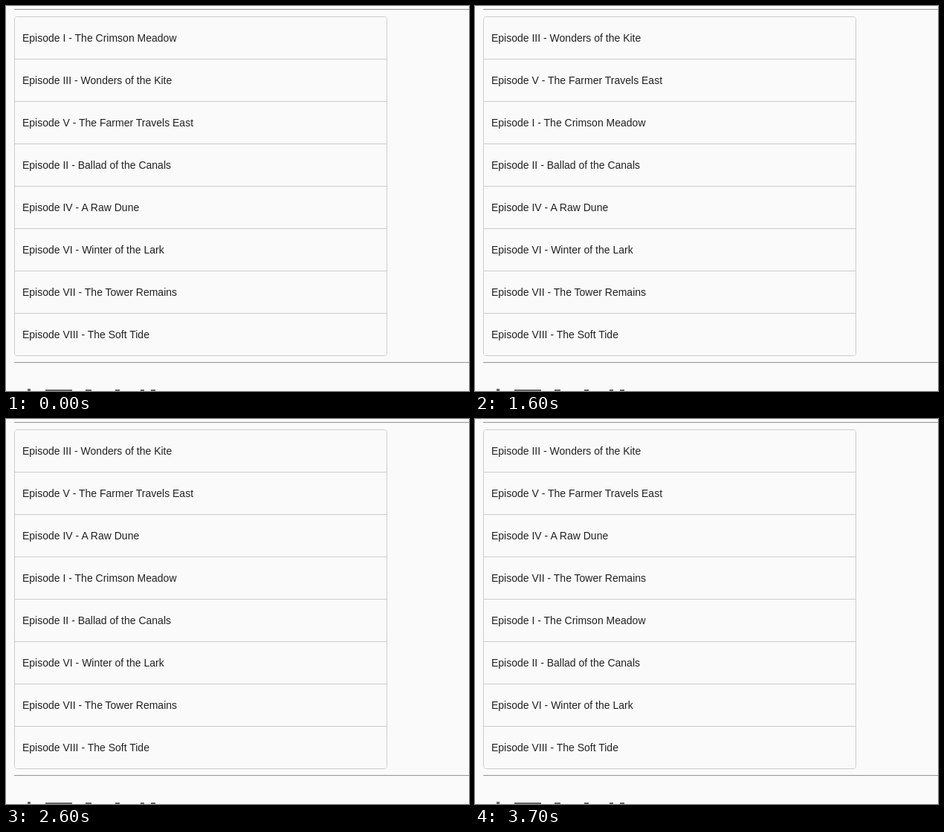
Recreate the animation shown at these times as an HTML page. Size 623 px wide and 518 px high, loop 5200 ms.

```html
<!DOCTYPE html>
<html lang="en">
<head>
<meta charset="utf-8">
<title>Sortable list</title>
<style>
  html, body { margin: 0; width: 100%; height: 100%; overflow: hidden; background: #fafafa; }
  #stage { position: relative; width: 623px; height: 518px; overflow: hidden; }
  #stage div { position: absolute; box-sizing: border-box; }
  .rule { left: 11px; width: 612px; height: 2px; border-top: 1px solid #9a9a9a; border-bottom: 1px solid #eee; }
  #list { left: 11px; top: 14px; z-index: 1; width: 502px; border: 1px solid #ccc; border-radius: 4px; overflow: hidden; }
  .row {
    left: 0; top: 0; width: 500px; height: 57px; padding: 20px 10px;
    border-bottom: 1px solid #ccc; background: #fafafa; color: #212121;
    font: 14px/16px "Liberation Sans", Arial, sans-serif; white-space: nowrap;
  }
  .row.moving { color: #484848; }
  #slot { left: 0; top: 0; width: 500px; height: 66px; background: #ccc; border: 3px dotted #999; }
  #stage #preview {
    z-index: 2; padding-top: 21px; border: 0; border-radius: 4px;
    box-shadow: 0 5px 5px -3px rgba(0,0,0,.2), 0 8px 10px 1px rgba(0,0,0,.14), 0 3px 14px 2px rgba(0,0,0,.12);
  }
  #footer { left: 0; top: 0; width: 623px; height: 520px; }
  .scrap { height: 4px; background: #666; }
</style>
</head>
<body>
<div id="stage">
  <div class="rule" style="top:4px"></div>
  <div id="footer"><div class="rule" style="top:479px"></div></div>
  <div id="list"><div id="slot"></div></div>
  <div id="preview" class="row moving"></div>
</div>
<script>
const LOOP = 5200, TICK = 100, ROW = 57, SLOT = 66, SLIDE = 250;
const LEFT = 12, TOP = 15;

const titles = [
  'I - The Crimson Meadow',
  'III - Wonders of the Kite',
  'V - The Farmer Travels East',
  'II - Ballad of the Canals',
  'IV - A Raw Dune',
  'VI - Winter of the Lark',
  'VII - The Tower Remains',
  'VIII - The Soft Tide'
].map(title => 'Episode ' + title);

// swaps: moments the slot trades places; path: [time, x, y] until release
const drags = [
  { start: 800, end: 1600, from: 0, to: 2, swaps: [880, 1088],
    path: [[800, 18, 38], [1100, 13, 116], [1300, 13, 145], [1340, 13, 146]] },
  { start: 2000, end: 2600, from: 4, to: 2, swaps: [2055, 2154],
    path: [[2000, 28, 221], [2100, 34, 179], [2200, 35, 137], [2300, 32, 104], [2340, 31, 104]] },
  { start: 3200, end: 3700, from: 6, to: 3, swaps: [3150, 3260, 3350],
    path: [[3200, 25, 300], [3300, 24, 246], [3400, 22, 203], [3430, 21, 197]] }
];

const byId = id => document.getElementById(id);
const list = byId('list'), slot = byId('slot'), preview = byId('preview'), footer = byId('footer');
const move = (el, x, y) => { el.style.transform = `translate(${Math.round(x)}px, ${Math.round(y)}px)`; };
const show = (el, visible) => { el.style.display = visible ? '' : 'none'; };
const mix = (a, b, k) => a + (b - a) * k;
const clamp = v => Math.min(1, Math.max(0, v));

function addDiv(parent, className) {
  const el = parent.appendChild(document.createElement('div'));
  el.className = className;
  return el;
}

const rows = titles.map(title => {
  const el = addDiv(list, 'row');
  el.textContent = title;
  return el;
});

// Tops of the heading that is cut off by the lower edge
for (const [x, y, w] of [[29, 515, 4], [53, 516, 36], [107, 516, 8], [147, 516, 6], [181, 516, 5], [195, 516, 6]]) {
  Object.assign(addDiv(footer, 'scrap').style, { left: x + 'px', top: y + 'px', width: w + 'px' });
}

// cubic-bezier(0, 0, .2, 1)
function ease(x) {
  if (x <= 0 || x >= 1) return clamp(x);
  let lo = 0, hi = 1;
  for (let i = 0; i < 24; i++) {
    const s = (lo + hi) / 2;
    if (0.6 * s * s * (1 - s) + s ** 3 < x) lo = s; else hi = s;
  }
  return 3 * lo * lo * (1 - lo) + lo ** 3;
}

const slide = (t, start) => ease((t - start) / SLIDE);

function previewAt({ path, to }, t) {
  const [dropTime, dropX, dropY] = path[path.length - 1];
  if (t >= dropTime) {
    const k = slide(t, dropTime);
    return [mix(dropX, LEFT, k), mix(dropY, TOP + to * ROW, k)];
  }
  const i = path.findIndex(point => point[0] > t);
  const [t0, x0, y0] = path[i - 1], [t1, x1, y1] = path[i];
  const k = (t - t0) / (t1 - t0);
  return [mix(x0, x1, k), mix(y0, y1, k)];
}

// Each swap takes over from wherever the previous one has brought the slot
function slotAt({ from, to, swaps }, t) {
  const dir = Math.sign(to - from);
  return swaps.reduce((top, start, n) => {
    const until = Math.min(t, swaps[n + 1] ?? t);
    return mix(top, (from + dir * (n + 1)) * ROW, slide(until, start));
  }, from * ROW);
}

function orderAt(t) {
  const order = rows.map((_, i) => i);
  for (const { end, from, to } of drags) {
    if (t >= end) order.splice(to, 0, order.splice(from, 1)[0]);
  }
  return order;
}

function render(t) {
  const order = orderAt(t);
  const drag = drags.find(d => t >= d.start && t < d.end);
  const extra = drag ? SLOT - ROW : 0;
  const tops = order.map((_, i) => i * ROW + (drag && i > drag.from ? extra : 0));
  const moving = new Set();

  show(slot, drag);
  show(preview, drag);
  if (drag) {
    const { from, to, swaps } = drag;
    const dir = Math.sign(to - from);
    swaps.forEach((start, n) => {
      const i = from + dir * (n + 1), k = slide(t, start);
      tops[i] -= dir * SLOT * k;
      if (k > 0 && k < 1) moving.add(i);
    });
    move(slot, 0, slotAt(drag, t));
    slot.style.zIndex = from;
    preview.textContent = titles[order[from]];
    move(preview, ...previewAt(drag, t));
  }

  order.forEach((id, i) => {
    const row = rows[id];
    show(row, !drag || i !== drag.from);
    row.classList.toggle('moving', moving.has(i));
    row.style.zIndex = i;
    move(row, 0, tops[i]);
  });
  list.style.height = ROW * rows.length + 1 + extra + 'px';
  move(footer, 0, extra);
}

function loop(now) {
  render(Math.floor((now % LOOP) / TICK) * TICK);
  requestAnimationFrame(loop);
}

render(0);
requestAnimationFrame(loop);
</script>
</body>
</html>
```
